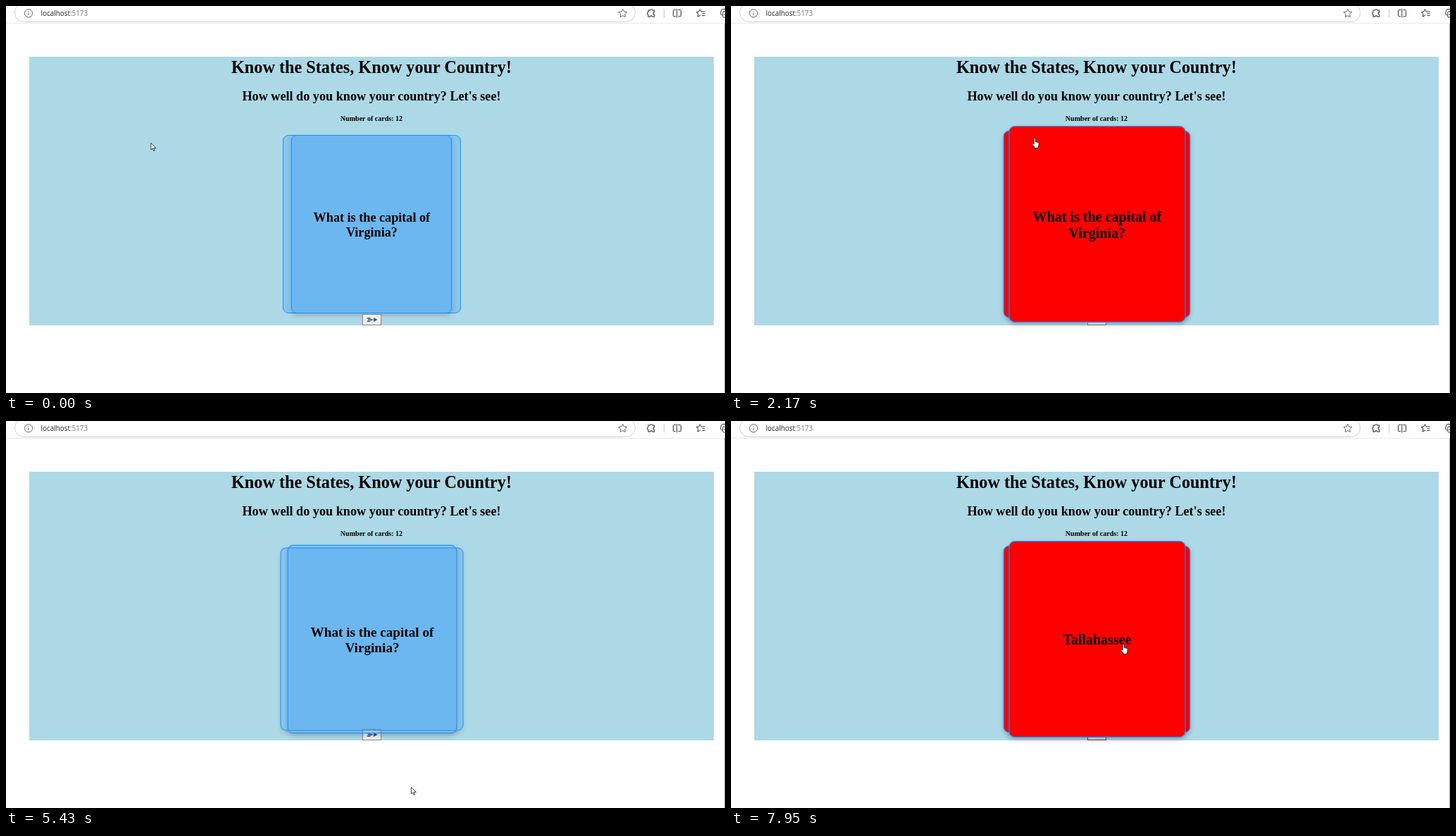
These frames come from a looping animation (1021x549 px, 8 s). An HTML page:

```html
<!DOCTYPE html>
<html lang="en">
<head>
<meta charset="utf-8">
<title>Flash cards</title>
<style>
html, body { margin: 0; width: 100%; height: 100%; overflow: hidden; background: #fefefe; }
#stage { position: relative; width: 1021px; height: 549px; overflow: hidden;
  font-family: "Liberation Serif", "Times New Roman", serif; font-weight: bold; color: #000; }
#stage > * { position: absolute; }
#bar { left: 0; top: 0; }
#page { left: 33.3px; top: 72px; width: 971.4px; height: 381px; background: #add8e6; }
#edge { left: 1020px; top: 25px; width: 1px; height: 524px; background: #b4b4b4; }
.line { left: 33.3px; width: 971.4px; text-align: center; white-space: nowrap; line-height: 1.15; }
.h1 { top: 73.1px; font-size: 24.24px; }
.h2 { top: 117.8px; font-size: 18.18px; }
.h5 { top: 154.3px; font-size: 10.06px; }

.face { box-sizing: border-box; border: 1px solid #1e90ff; border-radius: 8px;
  background: rgba(26, 138, 250, .25); transform: scale(var(--s)); }
#card { --s: 1; --p: 0; left: 392.8px; top: 183.3px; width: 253.2px; height: 253.2px;
  box-shadow: 0 3px 6px rgba(0, 0, 0, calc(.2 * var(--p))); }
#front { position: absolute; left: 11.6px; top: -1px; width: 228px; height: 253.2px;
  box-shadow: 0 3px 6px rgba(0, 0, 0, .2); padding-top: 2px;
  display: flex; align-items: center; justify-content: center;
  text-align: center; font-size: 18.18px; line-height: 20.9px; white-space: pre; }
.hot, .hot .face { background: #f00; }
#next { left: 505.5px; top: 436.5px; width: 27px; height: 16.3px; box-sizing: border-box;
  border: 1px solid #858585; background: #efefef; z-index: 1; }
#next svg { position: absolute; left: 0; top: 0; }
#next.over { background: #e5e5e5; }
#next.down { background: #d8d8dc; }
#next.focus { background: #d3dbee; border-color: #55585f; }
.cursor { left: 0; top: 0; z-index: 3; overflow: visible; fill: #fff; stroke: #111; stroke-width: .8; stroke-linejoin: round; }
</style>
</head>
<body>
<div id="stage">
  <svg id="bar" width="1021" height="26" fill="none" stroke="#444" stroke-width="1">
    <path d="M0 24.5H1021" stroke="#e9e9e9"/>
    <rect x="12.5" y="-3.5" width="881" height="26" rx="13" fill="#fff" stroke="#cfcfcf"/>
    <circle cx="32" cy="10.3" r="5.6" stroke="#666"/>
    <path d="M32 9.6V13.2M32 7.2V8.4" stroke="#555"/>
    <text x="49.5" y="13.8" font-family="Open Sans, Noto Sans, sans-serif" font-size="9.9" font-weight="400" stroke="none" fill="#222">localhost<tspan fill="#777">:5173</tspan></text>
    <path d="M875.8 4.4L877.6 8.1 881.7 8.7 878.7 11.5 879.4 15.6 875.8 13.7 872.2 15.6 872.9 11.5 869.9 8.7 874 8.1Z" stroke="#666"/>
    <path d="M912 6H914.4A1.9 1.9 0 0 1 918 6H920.5V8.6A1.9 1.9 0 0 0 920.5 12.3V15.2H918A1.9 1.9 0 0 0 914.4 15.2H912V12.4A2 2 0 0 1 912 8.6Z" stroke="#333" stroke-width="1.1"/>
    <path d="M934.5 4.5V16.5" stroke="#c8c8c8"/>
    <path d="M951 5.5H948.5Q947.5 5.5 947.5 6.5V13.8Q947.5 14.8 948.5 14.8H951M954.5 5.5H957.5Q958.5 5.5 958.5 6.5V13.8Q958.5 14.8 957.5 14.8H954.5M952.7 4V16.4" stroke="#333"/>
    <path d="M985.5 4.6L987 8H992.5M988.5 10.8H992.5M988.5 13.6H992.5M985.5 4.6L983.9 8.1 980.3 8.6 983 11 982.2 15.2 986.2 13" stroke="#333"/>
    <path d="M1021 4.5H1018Q1016 4.5 1015.5 7L1014.6 10Q1014.6 12.5 1017 13M1021 8H1019Q1017.8 8 1017.8 9.4V14.5Q1017.8 16 1019.2 16H1021M1019.4 12H1021" stroke="#333"/>
  </svg>
  <div id="page"></div>
  <div id="edge"></div>
  <div class="line h1">Know the States, Know your Country!</div>
  <div class="line h2">How well do you know your country? Let's see!</div>
  <div class="line h5">Number of cards: 12</div>
  <div id="card" class="face"><div id="front" class="face"></div></div>
  <div id="next">
    <svg width="25" height="14" fill="none" stroke="#2f4d72" stroke-width="1">
      <path d="M8 7H18M6 4.6H10L12 7 10 9.4H6L8 7ZM8 4.6L10 7 8 9.4"/>
      <path d="M14.5 3.8L20.5 7 14.5 10.2 16 7Z" fill="#2f4d72" stroke="none"/>
    </svg>
  </div>
  <svg id="arrow" class="cursor" width="8" height="13"><path d="M.4 .4V10L2.6 8 4.1 11.5 5.6 10.9 4.1 7.4H7.2Z"/></svg>
  <svg id="hand" class="cursor" width="11" height="16"><path d="M3.2 9V1.6A1.1 1.1 0 0 1 5.4 1.6V5.5L9 6.3Q10.4 6.7 10.3 8.1L9.7 12.1 8.9 14.5H4.4L3.6 12.6 .8 9.2Q.4 8.2 1.4 8 2.2 8 3.2 9Z"/></svg>
</div>
<script>
const $ = id => document.getElementById(id);

// The picture advances in ticks; all times below are in ticks.
const LOOP = 8000, TICK = 134.45, LAG = 15, GROW = 2;

// turning points of the pointer: tick, x, y
const turns = [
  [0, 205.5, 194], [5, 667, 236], [7, 858, 390], [9, 813, 357], [10, 617, 299],
  [12, 449, 264], [14, 444, 262], [16, 427, 187], [18, 380, 115], [19, 370, 115],
  [20, 358, 175], [24, 528, 348], [27, 530, 352], [37, 530, 352], [40, 575, 519],
  [42, 533, 463], [45, 518, 444.5], [51, 518, 444.5], [54, 552, 308], [58, 552, 308],
  [59, 553, 316]
];
const hovers = [[2, 5], [10.1, 17], [21, 39.55], [52, 62]];
const ask = state => `What is the capital of\n${state}?`;
const texts = [[0, ask('Virginia')], [28, 'Richmond'], [36, ask('Virginia')],
  [48, ask('Florida')], [57, 'Tallahassee']];
const button = [[0, ''], [43, 'over'], [47, 'down'], [48, 'focus']];

const latest = (rows, k) => rows.findLast(row => row[0] <= k);
const ease = x => 1 - (1 - Math.min(1, Math.max(0, x))) ** 2.3;

function pointerAt(k) {
  const from = latest(turns, k);
  const to = turns.find(row => row[0] > k) || from;
  const f = (k - from[0]) / (to[0] - from[0] || 1);
  return [1, 2].map(i => from[i] + (to[i] - from[i]) * f);
}

function draw() {
  const t = performance.now() % LOOP;
  const k = Math.max(0, Math.floor((t - LAG) / TICK));
  const [x, y] = pointerAt(k);
  const hot = hovers.some(([on, off]) => k >= on && k < off);
  const grown = hovers.reduce((sum, [on, off]) =>
    sum + ease((k - on) / GROW) - ease((k - off) / GROW), 0);

  const card = $('card');
  card.style.setProperty('--s', 1 + .05 * grown);
  card.style.setProperty('--p', grown);
  card.style.zIndex = grown > .001 ? 2 : 0;
  card.classList.toggle('hot', hot);

  const text = latest(texts, k)[1];
  if ($('front').textContent !== text) $('front').textContent = text;
  $('next').className = latest(button, k)[1];

  for (const id of ['arrow', 'hand']) {
    $(id).style.transform = `translate(${x}px, ${y}px)`;
    $(id).style.visibility = (id === 'hand') === hot ? 'visible' : 'hidden';
  }
  requestAnimationFrame(draw);
}
draw();
</script>
</body>
</html>
```
